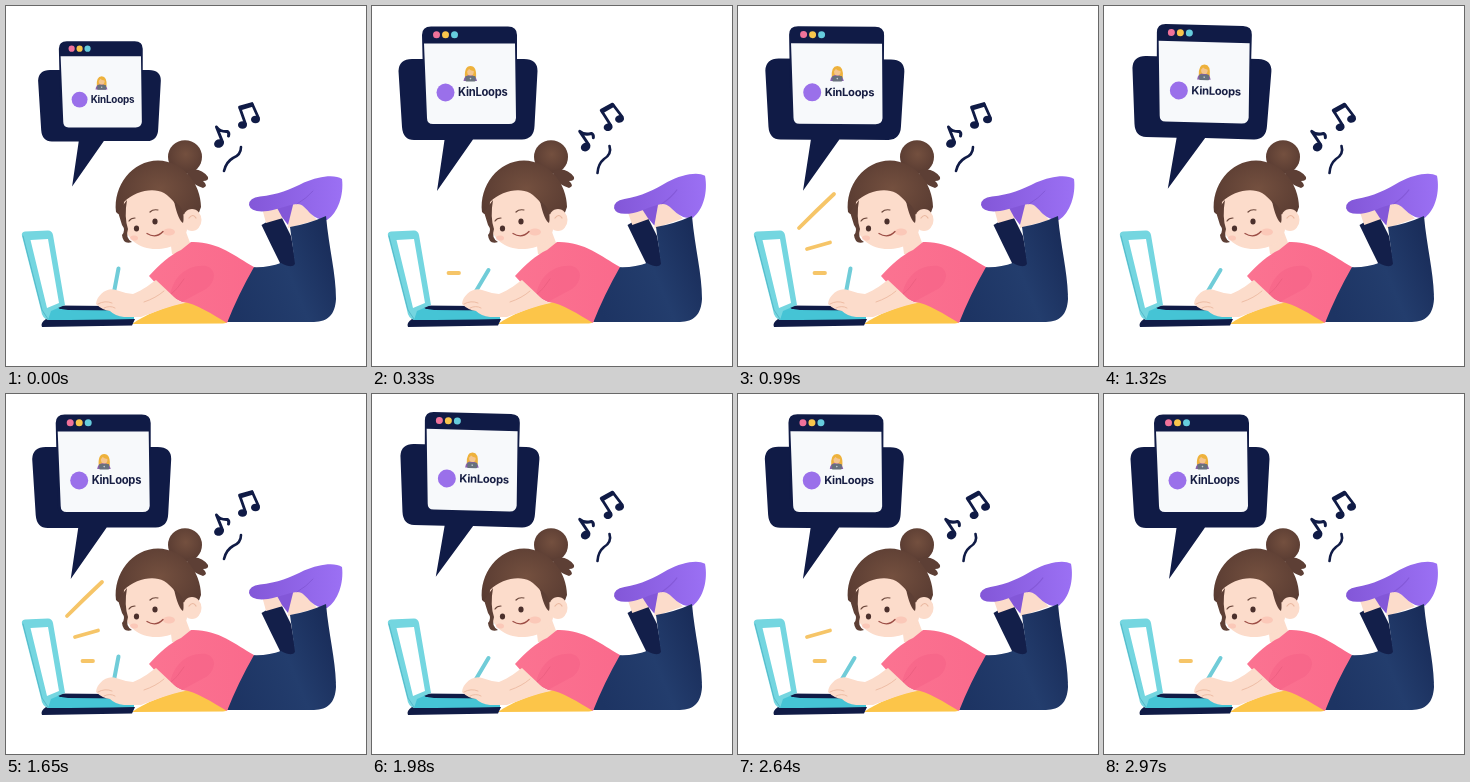
These frames come from a looping animation (360 by 360 pixels, 3300 ms). An HTML page:

```html
<!DOCTYPE html>
<html lang="en">
<head>
<meta charset="utf-8">
<title>Girl learning on a laptop</title>
<style>
html, body { margin: 0; width: 100%; height: 100%; overflow: hidden; background: #fff; }
svg { display: block; width: 100%; height: 100%; }
.navy { fill: #101b46; }
.skin { fill: #fcdccb; }
.teal { fill: #74d6e0; }
.line { fill: none; stroke-linecap: round; stroke-linejoin: round; }
.brand { font: 700 11.2px Inter, Arial, sans-serif; fill: #171e43; letter-spacing: -.25px; }
</style>
</head>
<body>
<svg viewBox="0 0 360 360">
  <defs>
    <radialGradient id="hair" cx=".52" cy=".42" r=".62">
      <stop offset="0" stop-color="#74503f"/><stop offset="1" stop-color="#573a31"/>
    </radialGradient>
    <linearGradient id="jeans" x1="0" x2="1" y1=".7" y2=".3">
      <stop offset="0" stop-color="#1d3463"/><stop offset=".55" stop-color="#233d6d"/><stop offset="1" stop-color="#192c59"/>
    </linearGradient>
    <linearGradient id="shoe" x1="0" x2="1">
      <stop offset="0" stop-color="#8357d8"/><stop offset="1" stop-color="#9b70f4"/>
    </linearGradient>
    <linearGradient id="shirt" x1="0" x2="1">
      <stop offset="0" stop-color="#fb7391"/><stop offset="1" stop-color="#fa6a8c"/>
    </linearGradient>
  </defs>

  <g id="bubble">
    <path class="navy" d="M40 53H152Q165.500 53 165.500 65L162.500 120Q162 133 150 133.500H101L65 185L72.500 134H42Q31 134 30 121L26.500 65Q27 53 40 53Z"/>
    <path class="navy" d="M59 20.500H136Q145 20.500 145 29V113Q145 120 138 120H58Q52 120 52 113L50 29Q50 20.500 59 20.500Z"/>
    <path fill="#f7f9fb" d="M52 37.500H143L144 112Q143.500 118 137 118H61Q55 118 55 112Z"/>
    <circle cx="64.500" cy="28.800" r="3.500" fill="#f0729a"/>
    <circle cx="73.500" cy="28.800" r="3.500" fill="#f8c64c"/>
    <circle cx="82.500" cy="28.800" r="3.500" fill="#66cddd"/>
    <g id="coder">
      <path fill="#eeb23c" d="M93 72Q92 60 98.500 60T104 72Z"/>
      <path fill="#8a5fae" d="M91.500 75Q92 69 98 69T105 75Z"/>
      <ellipse cx="98.500" cy="65.800" rx="3.300" ry="3.700" fill="#f4c58f"/>
      <path fill="#eeb23c" d="M94.700 65Q95 60.800 98.500 61T102.300 65Q98 64.500 97 62.800Q96.500 64.500 94.700 65Z"/>
      <rect x="93.500" y="70" width="10" height="5.500" rx="1" fill="#68717c"/>
      <circle cx="98.500" cy="72.600" r=".8" fill="#c6ccd2"/>
    </g>
    <circle cx="73.500" cy="86.500" r="9" fill="#9a70ea"/>
    <text class="brand" x="86" y="90">KinLoops</text>
  </g>

  <g class="line" stroke="#f6c568" stroke-width="3.800">
    <path id="ray0" d="M76.500 267H87"/>
    <path id="ray1" d="M69 243L92 236.500"/>
    <path id="ray2" d="M61 222Q79 204 96 188"/>
  </g>

  <g id="single">
    <ellipse class="navy" cx="213" cy="137.500" rx="5" ry="4.200" transform="rotate(-20 213 137.500)"/>
    <path class="line" stroke="#101b46" stroke-width="3" d="M216.500 136L210.500 121Q214 126 221.500 125.500Q223.500 127 222.500 130"/>
  </g>
  <g id="pair">
    <ellipse class="navy" cx="236.500" cy="119" rx="4.500" ry="3.800"/>
    <ellipse class="navy" cx="249.500" cy="113.500" rx="4.500" ry="3.800"/>
    <path class="line" stroke="#101b46" stroke-width="2.800" d="M239.500 118L233.500 101L246 97.500L252.500 112"/>
    <path class="line" stroke="#101b46" stroke-width="3.600" d="M234.500 102.500L246 99"/>
  </g>
  <path id="squiggle" class="line" stroke="#101b46" stroke-width="2.600"/>

  <path fill="#131f4a" d="M255.500 219Q264 213 276 212L285 230L291 264L270 266L274 257Q265 239 255.500 219Z"/>
  <g id="feet">
    <path class="skin" d="M256 202L274 197L277 212L260 217Z"/>
    <path class="skin" d="M282 222L284 200Q289 194 295 196L311 214Z"/>
    <path fill="#8357d8" d="M270 200L288 195L282 219L276 211Z"/>
    <path fill="url(#shoe)" d="M243 199Q243 191.500 254 190.500C271 189 285 183 298 176.500C313 170 329 168 336 173C338 189 332 207 321 214Q313 215 305 208C300 203 297 198 291 198C281 199 273 203 262 205Q245 207 243 199Z"/>
    <path class="line" stroke="#7b50cc" stroke-width="1" opacity=".6" d="M291 198Q301 192 307 185"/>
  </g>
  <path fill="url(#jeans)" d="M245 261Q262 262 275 257Q286 263 289 258L284 221Q302 218 320 210C323 243 330 267 330 293C329 309 322 315.500 308 316H220Q230 290 245 261Z"/>

  <path class="skin" d="M164 232L180 226L186 242Q178 251 166 248Z"/>
  <path fill="#fcc549" d="M126 318C139 309 160 299 187 295L220 311Q224 317 217 317.500Z"/>
  <path fill="url(#shirt)" d="M143 270C153 259 164 249 175 244L185 236C211 235 229 250 248 261Q232 289 221 317C207 309 190 297 176 296Q160 290 143 270Z"/>
  <path fill="#ef5a80" opacity=".35" d="M164 290C167 271 181 258 200 260C211 263 210 276 200 283Q185 291 176 296Z"/>
  <path class="line" stroke="#e75a7c" stroke-width="1" opacity=".6" d="M163 290Q172 283 178 273"/>

  <path class="navy" d="M40 313H129L126 319.500Q80 320 36 321Q34 317 40 313Z"/>
  <path fill="#45c4d5" d="M36 303L57 300L128 306V313Q83 314 42 314Q38 309 36 303Z"/>
  <path class="navy" d="M51 299.500L104 300L118 304.500L62 304Q50 303 51 299.500Z"/>
  <path class="teal" fill-rule="evenodd" d="M19 225.500L42 224.500Q46 224.500 47 229L59 299L45 305L42 314Q36 312 35 304L16 230Q15 226 19 225.500ZM24.500 234L41 302L53 297L42 233Z"/>
  <path class="line" stroke="#55b9c9" stroke-width="1" d="M17 230L36 304L42 313"/>

  <path id="pen" class="line" stroke="#70ccd8" stroke-width="4"/>
  <path class="skin" d="M90 298C91 289 101 281 110 284Q118 287 127 288C138 284 145 277 150 274L168 291Q173 296 179 297C163 300 149 306 135 311H118Q109 310 104 305Q96 304 90 298Z"/>
  <path class="line" stroke="#eebda5" stroke-width="1" d="M92 298Q99 294 106 297M98 302Q104 299 109 302M138 296Q150 292 158 285"/>

  <ellipse cx="179" cy="151" rx="17" ry="16.800" fill="url(#hair)"/>
  <path fill="#5d3f35" d="M181 165Q194 160 202 171Q203 175 197 175Q203 180 197 182Q188 179 182 173Z"/>
  <path fill="url(#hair)" d="M110 206C107 180 126 154.500 152 154.500C177 155 195 178 195 201Q191 216 179 221L119 205Q114 211 110 206Z"/>
  <path class="skin" d="M118 196C129 185 147 181 158 187C166 192 172 201 178 209L181 224C178 236 166 243 150 243C133 243 120 233 117 216Z"/>
  <ellipse class="skin" cx="186" cy="214" rx="9.500" ry="11"/>
  <path class="line" stroke="#e9b79f" stroke-width="1.200" d="M183 212Q187 207 190 212"/>
  <path fill="#5d3f35" d="M168 195Q180 203 177 217Q172 214 168 195Z"/>
  <path fill="#5d3f35" d="M112 206L121 194Q118 211 122 223Q119 232 126 236Q117 239 116 229Q120 224 116 219Z"/>
  <ellipse cx="163" cy="226" rx="6" ry="3.500" fill="#f9a99b" opacity=".4"/>
  <ellipse cx="128" cy="232" rx="4" ry="2.600" fill="#f9a99b" opacity=".4"/>
  <ellipse cx="130.500" cy="222.500" rx="2.600" ry="3" fill="#4b302c"/>
  <ellipse cx="149" cy="215.500" rx="2.600" ry="3" fill="#4b302c"/>
  <path class="line" stroke="#6b473b" stroke-width="1.200" d="M123 215Q125 212 129 212M144 206Q147 203 152 204"/>
  <path class="line" stroke="#9c4d45" stroke-width="1.300" d="M141 227.500Q150 233 157 225.500"/>
</svg>
<script>
const STEP = 330;
const byId = id => document.getElementById(id);
const setAttrs = (id, attrs) => {
  for (const key in attrs) byId(id).setAttribute(key, attrs[key]);
};

// Each key pose: tilted or level, number of rays, bubble placement.
const poses = [
  { tilt: false, rays: 0, bubble: 'translate(8.7 17.2) scale(.883)' },
  { tilt: true,  rays: 1, bubble: '' },
  { tilt: true,  rays: 2, bubble: 'translate(.2 0) rotate(.2 96 100)' },
  { tilt: false, rays: 3, bubble: 'translate(.6 0) rotate(.4 96 100)' },
  { tilt: true,  rays: 0, bubble: 'translate(1 -1.500) rotate(1.500 96 100)' },
  { tilt: false, rays: 3, bubble: 'translate(-.3 0)' }
];
const order = [0, 1, 2, 3, 4, 5, 4, 3, 2, 1];

function draw(pose) {
  const { tilt, rays, bubble } = pose;
  setAttrs('bubble', { transform: bubble });
  setAttrs('feet', { transform: tilt ? 'translate(-1 0) rotate(-4 290 200)' : '' });
  setAttrs('single', { transform: tilt ? 'translate(-1 3) rotate(-12 216 130)' : '' });
  setAttrs('pair', { transform: tilt ? 'translate(-3 1) rotate(-13 243 108)' : '' });
  setAttrs('squiggle', { d: tilt
    ? 'M237.500 140Q240 148 232 153Q226 158 225.500 167'
    : 'M235 141Q235 149 227 152Q220 156 218 165' });
  setAttrs('pen', { d: tilt ? 'M104 285L116.500 264' : 'M108 286L112.500 262.500' });
  for (let i = 0; i < 3; i++) {
    setAttrs('ray' + i, { visibility: i < rays ? 'visible' : 'hidden' });
  }
}

let shown = -1;
const start = performance.now();
function tick() {
  const elapsed = Math.max(0, performance.now() - start);
  const now = order[Math.floor(elapsed / STEP) % order.length];
  if (now !== shown) draw(poses[shown = now]);
  requestAnimationFrame(tick);
}
tick();
</script>
</body>
</html>
```
